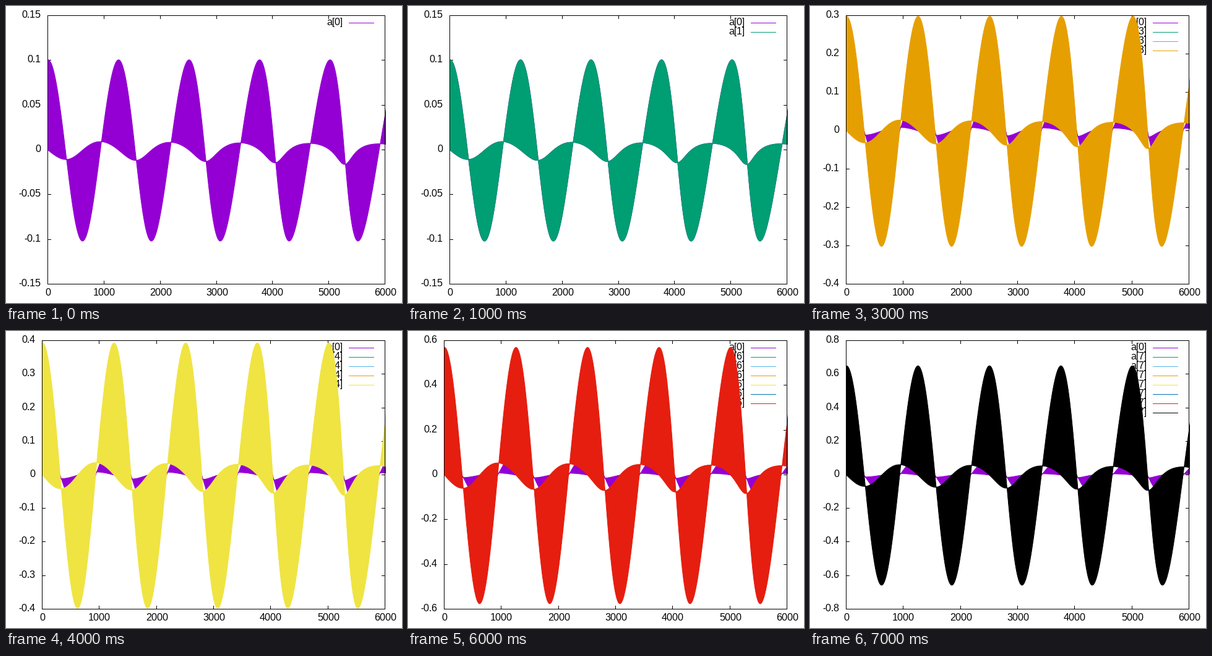
A matplotlib script that plays this animation: 640x480 px, repeating every 8 s.

```python
import numpy as np
import matplotlib.pyplot as plt
from matplotlib.animation import FuncAnimation
from matplotlib.patches import Rectangle

W, H, DPI = 640, 480, 100
TOP, BOTTOM, RIGHT = 15, 449, 612
X_MAX = 6000
PX = 72 / DPI  # one pixel in points

COLORS = ["#9400d3", "#009e73", "#56b4e9", "#e69f00",
          "#f0e442", "#0072b2", "#e51e10", "#000000"]

# (low, high, tick step) of the vertical axis for each step
RANGES = [(-0.15, 0.15, 0.05), (-0.15, 0.15, 0.05), (-0.25, 0.25, 0.05),
          (-0.4, 0.3, 0.1), (-0.4, 0.4, 0.1), (-0.5, 0.5, 0.1),
          (-0.6, 0.6, 0.2), (-0.8, 0.8, 0.2)]

plt.rcParams["font.family"] = "Liberation Sans"
plt.rcParams["font.size"] = 16 * PX
plt.rcParams["text.hinting"] = "default"
plt.rcParams["text.hinting_factor"] = 1
plt.rcParams["path.simplify"] = False

fig = plt.figure(figsize=(W / DPI, H / DPI), dpi=DPI, facecolor="white")
ax = fig.add_axes([0, 0, 1, 1])


def envelopes(n):
    """Time and the two envelopes of the fast oscillation of mass n."""
    phase = np.linspace(0, 32, 3000)
    amp = np.sin(0.1 * n)
    skew = 14.5 * np.cos(0.1 * n)
    period = 1240 + skew * np.cos(phase)
    t = phase * period / (2 * np.pi)
    speed = 1240 / (period - phase * skew * np.sin(phase))
    wide = amp * (1.0145 * np.cos(phase) - 0.003)
    narrow = -0.102 * amp * np.sin(phase) * speed ** 1.2
    return t, wide, narrow


def line(xs, ys, color="black", z=1):
    """Crisp one-pixel line; whole numbers snap to pixel centres."""
    ax.plot(xs, ys, color=color, lw=PX, antialiased=False, snap=True, zorder=z)


def draw(i):
    ax.clear()
    ax.axis("off")

    left = 67 if i < 3 else 58
    low, high, step = RANGES[i]

    def to_x(t):
        return left + t * (RIGHT - left) / X_MAX

    def to_y(v):
        return TOP + (high - v) * (BOTTOM - TOP) / (high - low)

    # ticks and their labels
    for t in range(0, X_MAX + 1, 1000):
        x = round(to_x(t))
        line([x, x], [BOTTOM, BOTTOM - 5])
        line([x, x], [TOP, TOP + 5])
        ax.text(x + 1, 468, str(t), ha="center", va="baseline")
    for k in range(round(low / step), round(high / step) + 1):
        y = round(to_y(k * step))
        line([left, left + 5], [y, y])
        line([RIGHT, RIGHT - 5], [y, y])
        ax.text(left - 11, y + 4, f"{k * step:.2g}", ha="right", va="baseline")

    # key, partly hidden by the curves
    for k in range(i + 1):
        y = 27 + 15 * k
        ax.text(544, y + 4, f"a[{i if k else 0}]", ha="right", va="baseline",
                zorder=1)
        line([554, 594], [y, y], COLORS[k])

    # first mass, then the newest one on top
    box = Rectangle((left, TOP), RIGHT + 1 - left, BOTTOM + 1 - TOP,
                    transform=ax.transData)
    for k in sorted({0, i}):
        t, wide, narrow = envelopes(max(k, 1))
        area = ax.fill_between(to_x(t) + 0.5, to_y(wide) + 0.5,
                               to_y(narrow) + 0.5, facecolor=COLORS[k],
                               edgecolor=COLORS[k], lw=PX, antialiased=False,
                               joinstyle="round", zorder=4 + k)
        area.set_clip_path(box)

    line([left, RIGHT, RIGHT, left, left], [TOP, TOP, BOTTOM, BOTTOM, TOP], z=20)
    ax.set_xlim(0, W)
    ax.set_ylim(H, 0)
    return []


anim = FuncAnimation(fig, draw, frames=len(RANGES), init_func=lambda: [],
                     interval=1000, repeat=True, repeat_delay=0)
plt.show()
```
